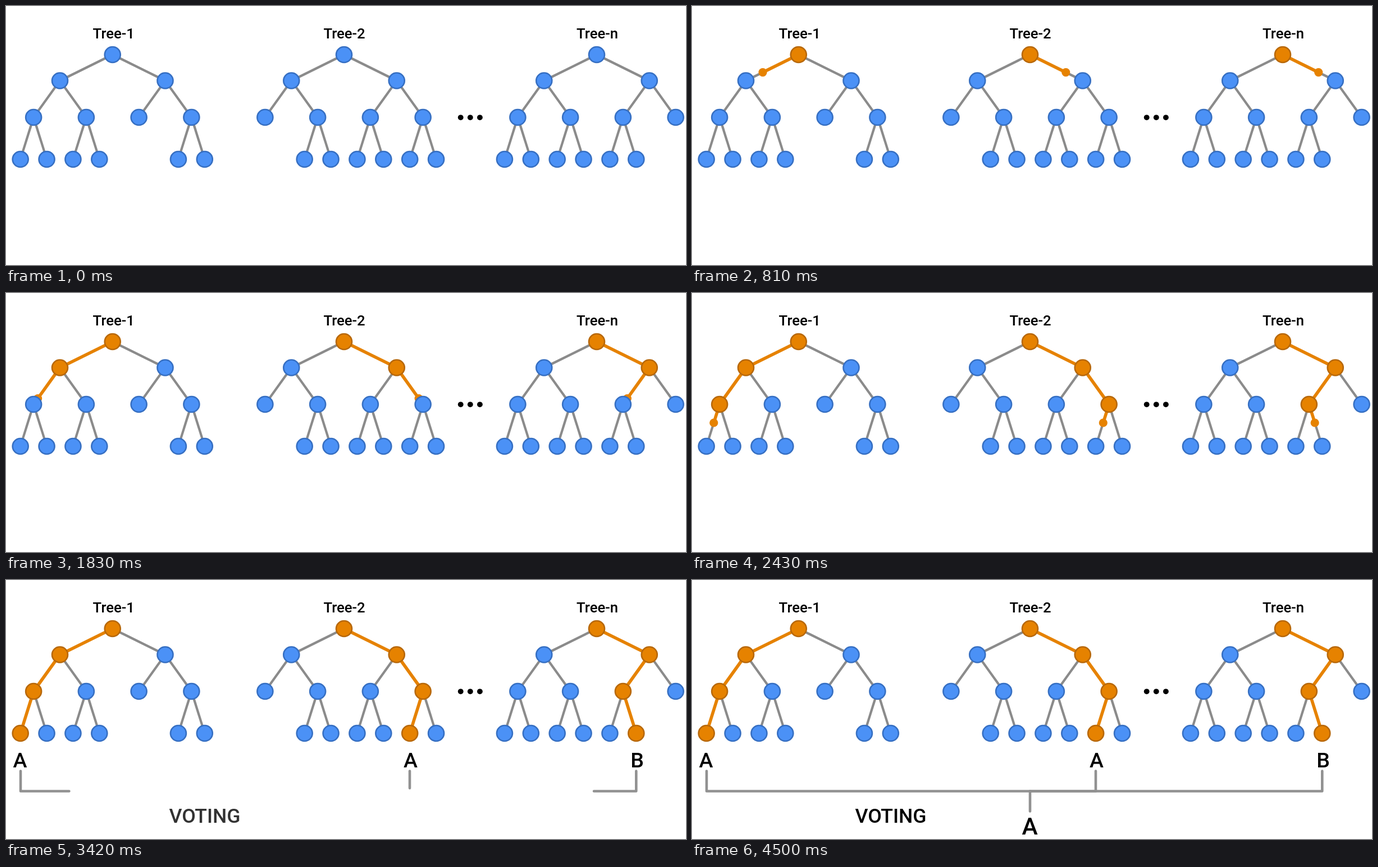
An HTML page for the animation above (5850 ms loop, 1211x463 px).

```html
<!DOCTYPE html>
<html lang="en">
<head>
<meta charset="utf-8">
<title>Random forest voting</title>
<style>
  html, body { margin: 0; width: 100%; height: 100%; overflow: hidden; background: #fff; }
  svg { display: block; width: 100%; height: 100%; }
  text { font-family: Roboto, Arial, sans-serif; font-weight: 500; text-anchor: middle; fill: #000; }
  .edge { stroke: #8b8b8b; stroke-width: 4.2; }
  .trail { stroke: #e68200; stroke-width: 5.6; }
  .spark { fill: #e68200; }
  .node { stroke-width: 2.6; }
  .bracket { fill: none; stroke: #919191; stroke-width: 4.6; stroke-linecap: round; stroke-linejoin: round; }
</style>
</head>
<body>
<svg id="stage" viewBox="0 0 1211 463"></svg>
<script>
const LOOP = 5850, STEP = 30;
const LEVEL_Y = [87, 133.5, 199, 274];
const GAP = 46.875;
const BLUE = [75, 145, 246], BLUE_RIM = [54, 111, 194];
const ORANGE = [230, 130, 0], ORANGE_RIM = [183, 104, 10];

// path: index of the visited node on each level; bare: third-level node without children
const TREES = [
  { x: 189.75, title: 'Tree-1', titleX: 191.7, path: [0, 0, 0, 0], bare: 2 },
  { x: 602, title: 'Tree-2', titleX: 602.5, path: [0, 1, 3, 6], bare: 0 },
  { x: 1052, title: 'Tree-n', titleX: 1053, path: [0, 1, 2, 5], bare: 3 }
];

const stage = document.getElementById('stage');
const updates = [];

const progress = (t, start, length) => Math.min(1, Math.max(0, (t - start) / length));
const mix = (a, b, p) => `rgb(${a.map((v, i) => Math.round(v + (b[i] - v) * p))})`;

function set(el, attrs) {
  for (const key in attrs) el.setAttribute(key, attrs[key]);
}

function add(tag, attrs, content) {
  const el = document.createElementNS('http://www.w3.org/2000/svg', tag);
  set(el, attrs);
  if (content) el.textContent = content;
  return stage.appendChild(el);
}

const label = (x, y, size, content) => add('text', { x, y, 'font-size': size }, content);

function fadeIn(el, start) {
  updates.push(t => set(el, { opacity: progress(t, start, 150) }));
}

function place(tree, level, i) {
  const count = 2 ** level;
  return { x: tree.x + (i - (count - 1) / 2) * GAP * 8 / count, y: LEVEL_Y[level] };
}

function line(cls, a, b) {
  return add('line', { class: cls, x1: a.x, y1: a.y, x2: b.x, y2: b.y });
}

// A trail and its leading dot run along one edge
function addTrail(from, to, start) {
  const trail = line('trail', from, from);
  const spark = add('circle', { class: 'spark', r: 7.6 });
  updates.push(t => {
    const p = progress(t, start, 750);
    const x = from.x + (to.x - from.x) * p, y = from.y + (to.y - from.y) * p;
    const visibility = p > 0 ? 'visible' : 'hidden';
    set(trail, { x2: x, y2: y, visibility });
    set(spark, { cx: x, cy: y, visibility });
  });
}

function addNode(at, start) {
  const node = add('circle', {
    class: 'node', cx: at.x, cy: at.y, r: 14, fill: mix(BLUE, BLUE, 0), stroke: mix(BLUE_RIM, BLUE_RIM, 0)
  });
  if (start === null) return;
  updates.push(t => {
    const p = progress(t, start, 300);
    const swell = 1 - Math.abs(2 * p - 1);
    const heat = Math.min(1, 2 * p);
    set(node, {
      r: 14 * (1 + 0.35 * swell),
      fill: mix(BLUE, ORANGE, heat),
      stroke: mix(BLUE_RIM, ORANGE_RIM, heat)
    });
  });
}

function addTree(tree) {
  const nodes = [];
  for (let level = 0; level < 4; level++) {
    for (let i = 0; i < 2 ** level; i++) {
      const parent = i >> 1;
      if (level === 3 && parent === tree.bare) continue;
      const at = place(tree, level, i);
      if (level) line('edge', place(tree, level - 1, parent), at);
      nodes.push([at, tree.path[level] === i ? 150 + 900 * level : null]);
    }
  }
  for (let level = 0; level < 3; level++) {
    addTrail(place(tree, level, tree.path[level]), place(tree, level + 1, tree.path[level + 1]), 300 + 900 * level);
  }
  nodes.forEach(([at, start]) => addNode(at, start));
  label(tree.titleX, 58, 25.7, tree.title);
}

function addBracket(d, start, length) {
  const path = add('path', { class: 'bracket', d, pathLength: 1 });
  updates.push(t => {
    const p = progress(t, start, length);
    set(path, { 'stroke-dasharray': `${p} 2`, visibility: p > 0 ? 'visible' : 'hidden' });
  });
}

TREES.forEach(addTree);
[809.7, 826.8, 843.9].forEach(cx => add('circle', { cx, cy: 199.3, r: 4.9 }));

[[25, 'A'], [720.5, 'A'], [1124, 'B']].forEach(([x, vote]) => fadeIn(label(x, 335, 37.5, vote), 3000));

[26, 719, 1122.3].forEach(x => addBracket(`M${x} 341.5V377.5H602`, 3300, 600));
addBracket('M602 377.5V413.5', 3900, 300);
fadeIn(label(354, 434, 35.6, 'VOTING'), 3300);

const winner = label(0, 0, 42.5, 'A');
fadeIn(winner, 4350);
updates.push(t => {
  const scale = 1.35 - 0.35 * progress(t, 4350, 150);
  set(winner, { transform: `translate(601.7 454.7) scale(${scale})` });
});

const origin = performance.now();
function draw() {
  const elapsed = (performance.now() - origin) % LOOP;
  const t = Math.floor(elapsed / STEP) * STEP;
  updates.forEach(update => update(t));
  requestAnimationFrame(draw);
}
draw();
</script>
</body>
</html>
```
